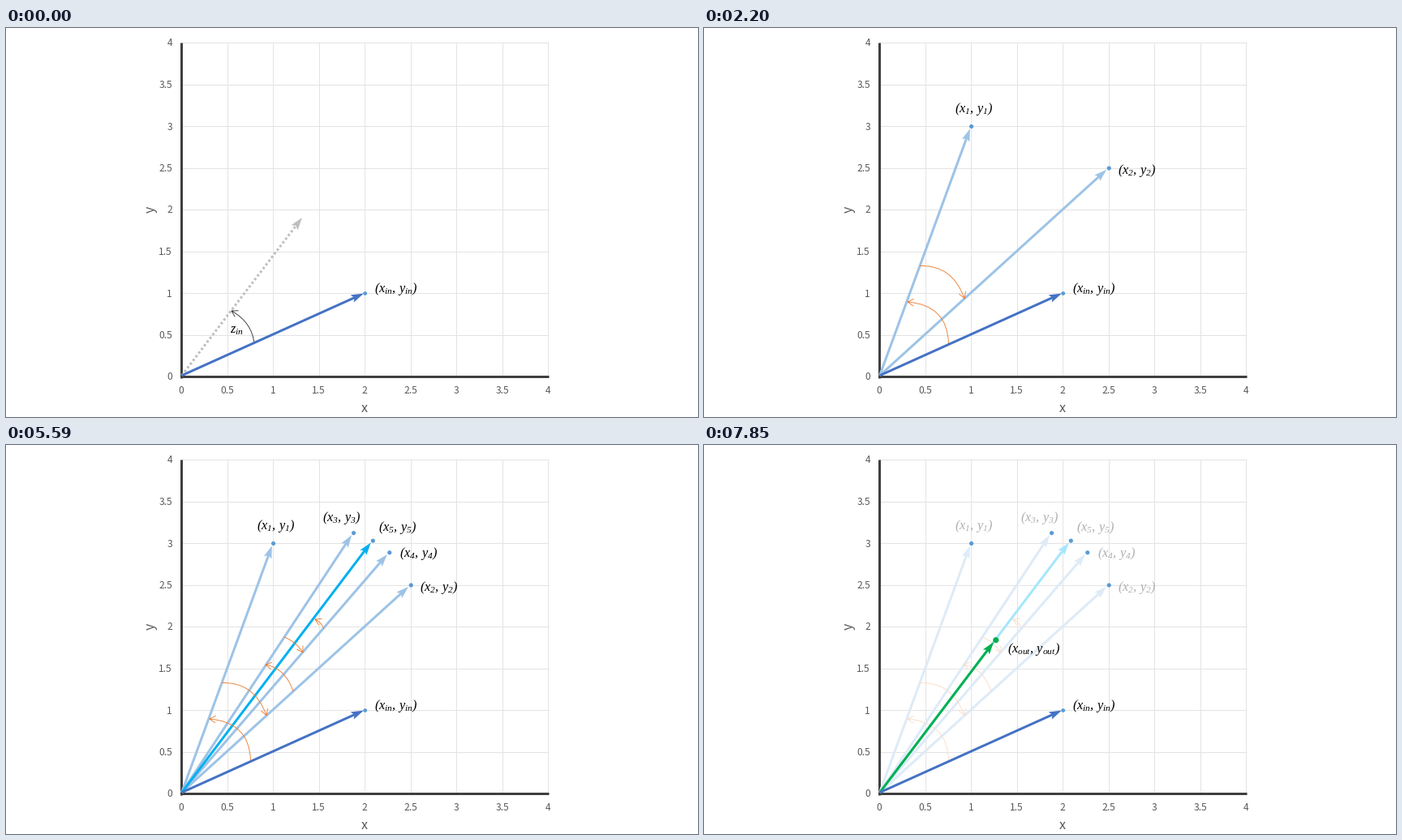
A matplotlib script for the animation above (8.98 s loop, 853x480 px).

```python
import numpy as np
import matplotlib.pyplot as plt
from matplotlib.animation import FuncAnimation
from matplotlib.collections import LineCollection
from matplotlib.patches import Circle, PathPatch, Polygon
from matplotlib.path import Path

W, H, DPI = 853, 480, 64
PT = 72 / DPI
STEP, LOOP = 20, 8980
STARTS = [0, 1070, 2200, 3330, 4460, 5590, 6720, 7850]
ALL = range(8)
BASE = np.array([216.6, 428.8])

BLUE, LIGHT, PALE = "#4472c4", "#9dc3e6", "#deebf7"
CYAN, PALE_CYAN, GREEN = "#00b0f0", "#a6e6fc", "#00b050"
ORANGE, PALE_ORANGE = "#ed7d31", "#fadcc8"
DOT, GREY, FADED = "#5b9bd5", "#bfbfbf", "#b0b0b0"

plt.rcParams.update({
    "font.family": "Noto Sans CJK JP",
    "mathtext.fontset": "custom",
    "mathtext.rm": "Liberation Serif:italic",
    "mathtext.it": "Liberation Serif:italic",
})

fig = plt.figure(figsize=(W / DPI, H / DPI), dpi=DPI, facecolor="white")
ax = fig.add_axes([0, 0, 1, 1])
ax.set_xlim(0, W)
ax.set_ylim(H, 0)
ax.axis("off")

parts = []  # (artist, stages in which it is visible)


def show(artist, stages):
    parts.append((artist, set(stages)))


def to_px(x, y):
    return np.array([216.5 + 113.1 * x, 430.5 - 103 * y])


def line(p, q, color, width, z, **style):
    return ax.plot(*zip(p, q), color=color, lw=width * PT, zorder=z,
                   solid_capstyle="butt", **style)[0]


def text(x, y, s, size, **style):
    return ax.text(x, y, s, fontsize=size * PT, **style)


def arrow(tip, color, stages, z, **style):
    u = (tip - BASE) / np.hypot(*(tip - BASE))
    n = np.array([-u[1], u[0]])
    show(line(BASE, tip - 11 * u, color, 3, z, **style), stages)
    head = [tip, tip - 15.5 * u + 5 * n, tip - 12.5 * u, tip - 15.5 * u - 5 * n]
    show(ax.add_patch(Polygon(head, fc=color, lw=0, zorder=z)), stages)


def vector(end, color, stages, z, gap=3.5):
    end = end - 0.5
    back = BASE - end
    arrow(end + gap * back / np.hypot(*back), color, stages, z)


def dot(p, r, color, stages):
    show(ax.add_patch(Circle(p, r, fc=color, lw=0, zorder=9)), stages)


def arc(start, ctrl, end, color, stages, z):
    start, ctrl, end = map(np.array, (start, ctrl, end))
    a = np.arctan2(*(ctrl - end)[::-1])
    barbs = [end + 8.5 * np.array([np.cos(a + d), np.sin(a + d)])
             for d in (-0.54, 0.54)]
    path = Path([start, ctrl, end, barbs[0], end, barbs[1]],
                [Path.MOVETO, Path.CURVE3, Path.CURVE3,
                 Path.MOVETO, Path.LINETO, Path.LINETO])
    show(ax.add_patch(PathPatch(path, fc="none", ec=color, lw=0.9 * PT,
                                zorder=z)), stages)


def label(x, y, sub, stages, color="black"):
    s = rf"$(x_{{{sub}}},\,y_{{{sub}}})$"
    show(text(x, y, s, 16.3, color=color, zorder=10), stages)


def draw_chart():
    ticks = np.arange(0, 4.5, 0.5)
    grid = []
    for t in ticks[1:]:
        x, y = np.floor(to_px(t, t))
        grid += [[(216, y), (669, y)], [(x, 18), (x, 430)]]
    ax.add_collection(LineCollection(grid, colors="#e3e3e3", lw=PT, zorder=0))
    line((216, 18), (216, 432), "#3f3f3f", 3, 1)
    line((215, 430), (669, 430), "#3f3f3f", 3, 1)
    for t in ticks:
        x, y = to_px(t, t)
        text(x - 0.7, 450.7, f"{t:g}", 12, ha="center", color="#595959")
        text(205, y + 4, f"{t:g}", 12, ha="right", color="#595959")
    text(442, 473.5, "x", 16, ha="center", color="#595959")
    text(178, 224, "y", 16, ha="center", va="center", rotation=90,
         color="#595959")


def draw_input():
    arrow(np.array([365, 234]), GREY, [0], 2,
          linestyle=(0, (0.95, 0.95)), dash_capstyle="butt")
    arc((306, 389), (303, 363), (278, 349), "#333333", [0], 6)
    show(text(276.5, 376.5, "$z_{in}$", 16.3, zorder=10), [0])
    end = to_px(2, 1)
    vector(end, BLUE, ALL, 8, gap=1.5)
    dot(end, 2.4, DOT, ALL)
    label(454, 326.5, "in", ALL)


def draw_steps():
    places = [(309.5, 104.5), (510.5, 180.5), (390, 94.5), (485, 137.5),
              (459, 105.5)]
    arcs = [((301.5, 389), (300, 342), (251, 338)),
            ((266, 293.5), (306, 292), (321, 333.5)),
            ((354, 304), (345, 276), (320, 271)),
            ((343, 237), (358, 243), (366, 256)),
            ((392, 227), (389, 219), (381, 215))]
    x, y, gain = 2.0, 1.0, 1.0
    for i in range(5):
        # one shift-and-add rotation, alternating in direction
        k = (-1) ** i / 2 ** i
        x, y = x - k * y, y + k * x
        gain *= np.hypot(1, k)
        end, last = to_px(x, y), i == 4
        fade = 7 if last else 6
        bright, dim = range(i + 1, fade), range(fade, 8)
        vector(end, CYAN if last else LIGHT, bright, 4 if last else 3)
        vector(end, PALE_CYAN if last else PALE, dim, 4 if last else 3)
        dot(end, 2.6, DOT, range(i + 1, 8))
        label(*places[i], i + 1, bright)
        label(*places[i], i + 1, dim, FADED)
        arc(*arcs[i], ORANGE, range(i + 1, 6), 5)
        arc(*arcs[i], PALE_ORANGE, range(6, 8), 3.5)
    out = to_px(x / gain, y / gain)
    vector(out, GREEN, [7], 7)
    dot(out, 3.6, GREEN, [7])
    label(374, 255.5, "out", [7])


draw_chart()
draw_input()
draw_steps()


def update(i):
    t = i * STEP + STEP / 2
    stage = sum(t >= s for s in STARTS) - 1
    for artist, stages in parts:
        artist.set_visible(stage in stages)
    return [artist for artist, _ in parts]


anim = FuncAnimation(fig, update, frames=LOOP // STEP, interval=STEP,
                     init_func=lambda: update(0), repeat=True, repeat_delay=0)
plt.show()
```
